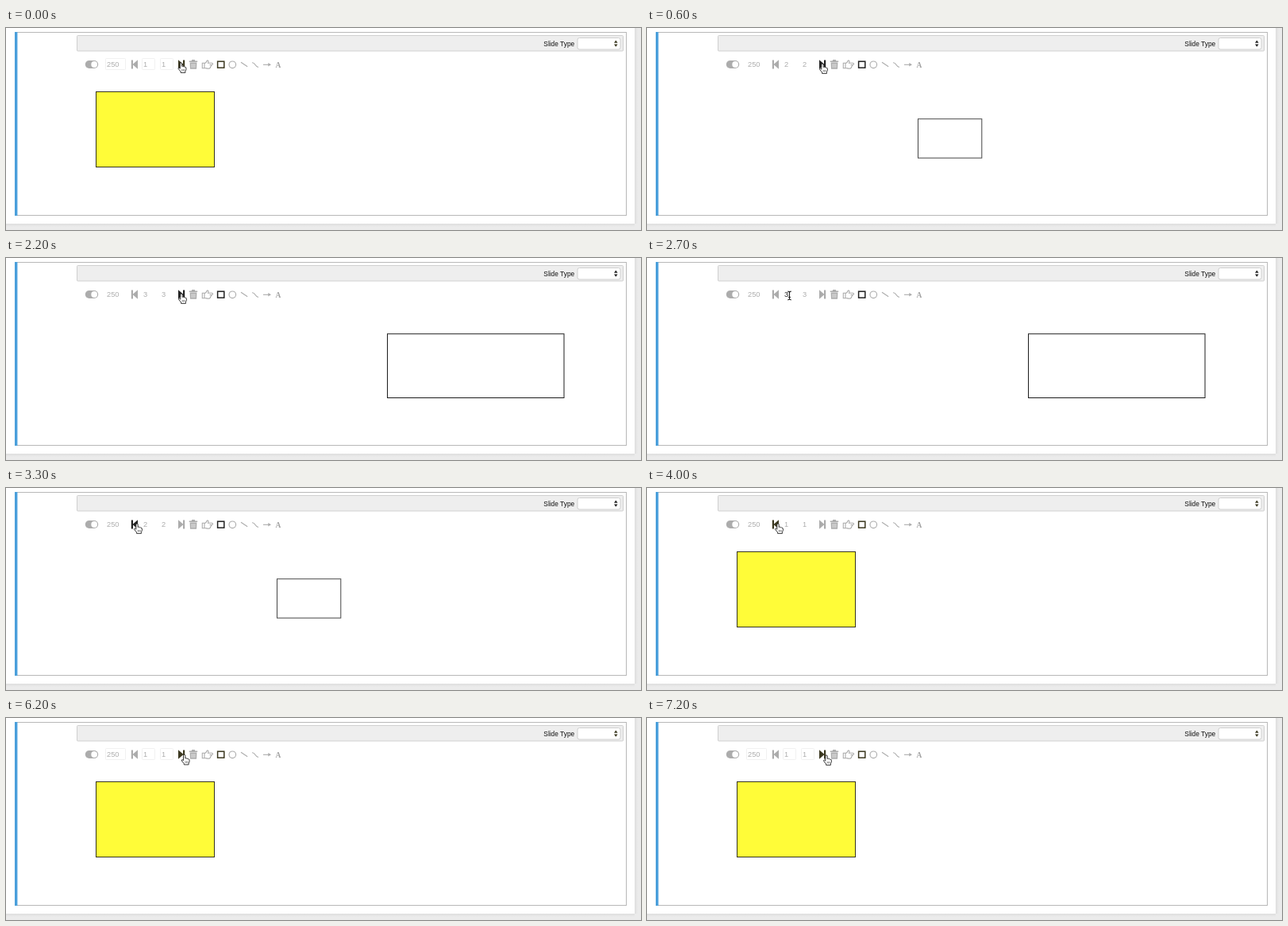
Write an HTML page that moves like this. It is 800 px wide and 255 px high and loops after 7.3 s.

```html
<!DOCTYPE html>
<html lang="en">
<head>
<meta charset="utf-8">
<title>Slide drawing toolbar</title>
<style>
html, body { margin: 0; width: 100%; height: 100%; overflow: hidden; background: #ebebeb; }
svg { display: block; width: 800px; height: 255px; --ink: #222; --soft: #acacac; }
text { font-family: "Liberation Sans", Arial, sans-serif; font-size: 9.3px; fill: var(--soft); }
.icon { fill: var(--soft); }
.line { fill: none; stroke: var(--soft); stroke-width: 1.1; }
.on { fill: var(--ink); }
.field { fill: #fff; stroke: #f1f1f1; }
.field.hot { stroke: #dadada; }
</style>
</head>
<body>
<svg viewBox="0 0 800 255">
  <defs>
    <linearGradient id="shadeY" x2="0" y2="1"><stop stop-color="#dedede"/><stop offset="1" stop-color="#ebebeb"/></linearGradient>
    <linearGradient id="shadeX"><stop stop-color="#dedede"/><stop offset="1" stop-color="#ebebeb"/></linearGradient>
  </defs>
  <rect width="800" height="255" fill="#ebebeb"/>
  <rect y="247" width="792" height="4" fill="url(#shadeY)"/>
  <rect x="792" width="4" height="247" fill="url(#shadeX)"/>
  <rect width="792" height="247" fill="#fff"/>

  <rect x="11.5" y="5.5" width="770" height="231" fill="#fff" stroke="#b8b8b8"/>
  <rect x="11" y="5" width="3.4" height="232" fill="#4a9fdb"/>

  <rect x="89.5" y="9.5" width="688" height="19.5" rx="1" fill="#eee" stroke="#cfcfcf"/>
  <text x="677.3" y="22.7" style="font-size:8.4px;fill:#111">Slide Type</text>
  <rect x="720" y="12.5" width="54" height="14.5" rx="2.5" fill="#fff" stroke="#cbcbcb" stroke-width=".9"/>
  <path class="on" d="M766 18.8L768.3 15.6L770.6 18.8ZM766 20.6H770.6L768.3 23.8Z"/>

  <g id="fields">
    <rect class="field" x="125.5" y="38.5" width="25" height="14" rx="1"/>
    <rect class="field" x="171.5" y="38.5" width="16" height="14" rx="1"/>
  </g>
  <rect id="lastField" class="field" x="194.5" y="38.5" width="16" height="14" rx="1"/>
  <text x="127" y="49.3">250</text>
  <text id="first" x="173" y="49.3">1</text>
  <text id="last" x="196" y="49.3">1</text>

  <rect class="icon" x="99.8" y="41" width="16.4" height="10" rx="5"/>
  <circle cx="111.2" cy="46" r="3.9" fill="#fff"/>
  <path id="prev" class="icon" d="M157.8 40.5H160V45.5L166 40.3V51.7L160 46.5V51.5H157.8Z"/>
  <path id="next" class="icon" d="M217 40.3L223 45.5V40.5H225.2V51.5H223V46.5L217 51.7Z"/>

  <path class="icon" d="M230.7 41.6H233.6L234.3 40H237.7L238.4 41.6H241.2V43H230.7ZM231.6 43.6H240.4L240 51.8H232Z"/>
  <path d="M234 45V50.3M236 45V50.3M238 45V50.3" stroke="#fff" stroke-width=".7"/>
  <path class="line" d="M247.3 44.2H250V50.8H247.3ZM250 44.5C252 44.4 252.8 42.5 253.4 41C255.3 40.6 255.4 42.6 254.5 44.2H259.3C261 44.3 261 46.4 259.3 46.5H256.5M259 46.6C258.8 47.6 258.6 48.4 257.5 48.5M257.9 48.6C257.6 50.4 256.8 51.2 255 51.3C253 51.3 252 50.6 250 50.5"/>
  <rect x="266.6" y="42.2" width="8.2" height="8" fill="none" stroke="var(--ink)" stroke-width="1.5"/>
  <circle class="line" cx="285.3" cy="46.3" r="4.3"/>
  <path class="line" d="M296 43.2L304.2 48.8M310 43.8C314.5 43.5 313 48.5 318 49.5"/>
  <path class="line" d="M324 46.3H331.5"/>
  <path class="icon" d="M330.3 44L334 46.3L330.3 48.6Z"/>
  <text x="339.5" y="50" style="font:bold 9.5px 'Liberation Serif',Times,serif;fill:#a2a2a2">A</text>

  <rect id="box"/>

  <g id="hand" stroke-linejoin="round">
    <path fill="#fff" stroke="#222" stroke-width=".9" d="M-1.2 7.2V1Q-1 -.1 0 -.1T1.2 1V4.4Q2.6 3.6 3.2 4.8Q4.6 4.2 5 5.4Q6.5 5.2 6.4 6.8V8.6L5.4 10.6V12.4H-.4V11L-3.3 7.6Q-3.9 6.1 -2.6 6.1Z"/>
    <path fill="none" stroke="#444" stroke-width=".6" d="M1.2 8V10.4M2.7 8V10.4M4.2 8V10.4"/>
  </g>
  <path id="beam" fill="none" stroke="#222" stroke-width="1.1" d="M-2.2 -5.4Q0 -5.2 0 -4Q0 -5.2 2.2 -5.4M0 -4.5V4.5M-2.2 5.4Q0 5.2 0 4Q0 5.2 2.2 5.4M-1.4 2H1.4"/>
</svg>
<script>
const LOOP = 7300, STEP = 100;
const el = id => document.getElementById(id);

// x, y, width, height, fill, line colour
const slides = {
  1: [113.5, 80.5, 149, 95, "#fffc38", "#35331c"],
  2: [341.5, 114.8, 80.3, 49.3, "#fff", "#444"],
  3: [480.5, 95.8, 222.5, 80.7, "#fff", "#1c1c1c"]
};
const cuts = [[0, 1], [600, 2], [1800, 3], [2900, 2], [4000, 1]];

// time, pointer x, pointer y
const path = [
  [0, 220.5, 44], [400, 221, 45], [2500, 221, 45], [2800, 165, 45],
  [4900, 165, 45], [5300, 212, 45], [5500, 225, 46.5], [5900, 225, 46.5],
  [6400, 224.5, 46.5], [6900, 224.5, 46.5], [7200, 226, 47], [LOOP, 226, 47]
];

function pointer(t) {
  const i = path.findIndex(p => p[0] > t);
  const a = path[i - 1], b = path[i];
  const k = (t - a[0]) / (b[0] - a[0]), e = k * k * (3 - 2 * k);
  return [a[1] + (b[1] - a[1]) * e, a[2] + (b[2] - a[2]) * e];
}

function draw(t) {
  const n = cuts.filter(c => c[0] <= t).pop()[1];
  const [x, y, w, h, fill, stroke] = slides[n];
  const attrs = { x, y, width: w, height: h, fill, stroke };
  for (const key in attrs) el("box").setAttribute(key, attrs[key]);
  el("first").textContent = el("last").textContent = n;

  const [px, py] = pointer(t);
  const overFirst = px > 171 && px < 188, overLast = px > 193 && px < 214;
  const text = overFirst || overLast;
  el("hand").style.display = text ? "none" : "";
  el("beam").style.display = text ? "" : "none";
  el("hand").setAttribute("transform", `translate(${px} ${py})`);
  el("beam").setAttribute("transform", `translate(${px} ${py + 2.5})`);

  const framed = t < 600 || t >= 5000;
  el("fields").style.display = framed ? "" : "none";
  el("lastField").style.display = framed || overLast ? "" : "none";
  el("lastField").classList.toggle("hot", overLast);
  el("first").classList.toggle("on", overFirst);
  el("last").classList.toggle("on", overLast);
  el("prev").classList.toggle("on", px < 171);
  el("next").classList.toggle("on", px >= 214);
  document.querySelector("svg").style.setProperty("--ink", n === 1 ? "#3b3820" : "#222");
}

const start = performance.now();
function tick(now) {
  const t = Math.max(0, now - start) % LOOP;
  draw(Math.floor(t / STEP) * STEP);
  requestAnimationFrame(tick);
}
draw(0);
requestAnimationFrame(tick);
</script>
</body>
</html>
```
